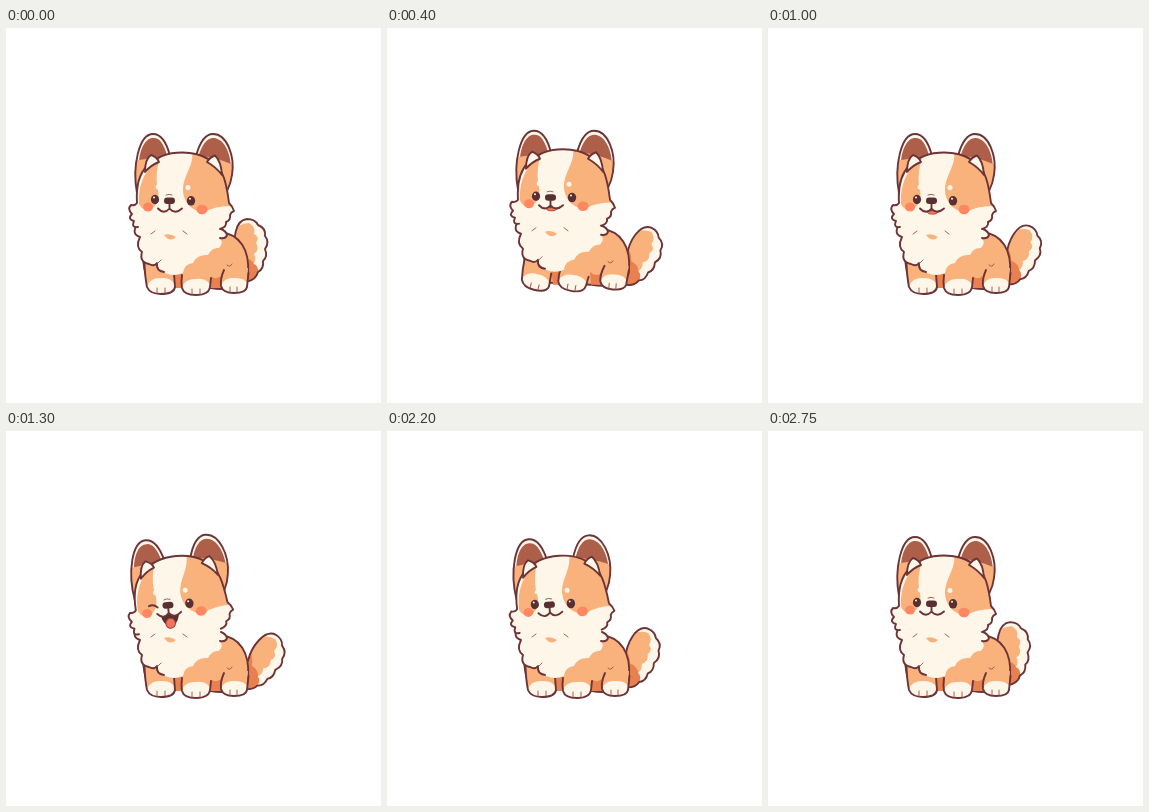
An HTML page that plays this animation: 375x375 px, repeating every 2.8 s.

```html
<!DOCTYPE html>
<html lang="en">
<head>
<meta charset="utf-8">
<title>Puppy</title>
<style>
html, body { margin: 0; width: 100%; height: 100%; overflow: hidden; background: #fff; }
svg { display: block; width: 100vw; height: 100vh; }
.line { stroke: #6c3437; stroke-width: 1.9; stroke-linecap: round; stroke-linejoin: round; }
.thin { stroke: #9a5245; stroke-width: .9; stroke-linecap: round; fill: none; }
.none { fill: none; }
.fur { fill: #f9b27c; }
.shade { fill: #e8804f; }
.cream { fill: #fff6ea; }
.brown { fill: #ae5f4a; }
.dark { fill: #592f32; }
.blush { fill: #ff8862; }
</style>
</head>
<body>
<svg viewBox="0 0 375 375">
  <defs>
    <path id="skull" d="M132 199Q125 200 128 193Q121 191 126 186Q121 181 125 177Q129 178 131 175C130 160 133 146 141 138C151 128 164 124.500 176 124.500C198 124.500 213 135 218 150C221 159 222 167 223 175Q227 179 228 183Q225 184 224 187Q225 192 220 194Q221 199 214 201"/>
    <path id="plume" d="M231 228C226 212 229 192 241 191Q249 191 252 197Q260 200 259 208Q264 214 259 221Q262 229 257 233Q258 241 252 244Q250 252 240 254L230 250Z"/>
    <path id="earL" d="M131 165C126 138 133 106 147 106C156 106 161 116 164 128L148 150Z"/>
    <path id="earR" d="M190 128C193 117 198 106 207 106C221 106 229 128 226 147Q225 155 221 163L206 152Z"/>
    <clipPath id="inSkull"><use href="#skull"/></clipPath>
    <clipPath id="inPlume"><use href="#plume"/></clipPath>
    <clipPath id="inEarL"><use href="#earL"/></clipPath>
    <clipPath id="inEarR"><use href="#earR"/></clipPath>
  </defs>

  <g id="tail">
    <use href="#plume" class="cream"/>
    <g clip-path="url(#inPlume)">
      <path class="fur" d="M226 258V206Q232 195 243 195Q250 199 248 206Q254 209 250 215Q254 222 248 226Q251 233 247 236L242 258Z"/>
      <path class="shade" d="M225 258V218Q233 220 237 230Q245 230 248 236Q253 238 252 246L246 258Z"/>
    </g>
    <use href="#plume" class="line none"/>
  </g>

  <g id="dog">
    <path class="line fur" d="M214 204C234 206 244 222 242 246Q241 258 225 260Q215 262 205 260L143 257Q137 242 137 226"/>
    <path class="shade" d="M164 242H178V260H166ZM203 247Q208 253 215 248V260H204Z"/>
    <path class="thin" d="M221 237q3 3 5 -1"/>

    <g id="legB">
      <path class="fur" d="M216 240Q214 250 215 259Q217 265 228 265Q240 265 241 259L242 240Z"/>
      <path class="cream" d="M215 257Q219 249 228 250Q238 249 242 256Q242 265 228 265Q215 265 215 257Z"/>
      <path class="line none" d="M218 242Q214 251 215 258Q217 265 228 265Q240 265 241 259L242.500 245"/>
      <path class="thin" d="M224 259v5M231 259v5"/>
    </g>
    <g id="legL">
      <path class="fur" d="M139 232Q139 248 141 260Q144 266 155 266Q168 266 169 259L168 232Z"/>
      <path class="cream" d="M141 257Q146 249 155 250Q164 249 169 256Q170 266 155 266Q142 266 141 257Z"/>
      <path class="line none" d="M138.500 236Q139 249 141 259Q144 266 155 266Q168 266 169 259L168 246"/>
      <path class="thin" d="M151 260v5M159 260v5"/>
    </g>
    <g id="legM">
      <path class="fur" d="M177 228Q174 248 176 260Q178 267 190 267Q203 267 204 259L208 228Z"/>
      <path class="cream" d="M176 258Q181 250 190 251Q199 250 204 256Q205 267 190 267Q176 267 176 258Z"/>
      <path class="line none" d="M176 247Q175 254 176 260Q178 267 190 267Q203 267 204 259L205 250"/>
      <path class="thin" d="M186 261v5M194 261v5"/>
    </g>

    <path class="cream" d="M131 196Q125 206 134 209Q129 219 136 224Q133 234 143 236Q148 239 151 236Q150 244 159 245Q168 249 177 245Q178 236 187 235Q191 226 202 227Q206 219 213 220Q218 214 214 211Q222 211 221 207Q219 202 214 198L212 186H140Z"/>
    <path class="line none" d="M131 197Q125 206 134 209Q129 219 136 224Q133 234 143 236Q148 239 151 235Q150 243 158 244M215 201Q220 203 221 207Q220 211 214 210"/>
    <path class="fur" d="M158 207Q164 205 170 209Q164 215 158 207Z"/>
    <path class="thin" d="M145 206l4 -3M177 203l4 3M152 235l3 -3"/>

    <g id="head">
      <use href="#earL" class="cream"/>
      <g clip-path="url(#inEarL)">
        <path class="brown" d="M133 134C134 120 140 109 148 110C156 110 159 121 162 130Z"/>
        <path class="fur" d="M126 133Q145 130 168 128V166H126Z"/>
      </g>
      <use href="#earL" class="line none"/>
      <use href="#earR" class="cream"/>
      <g clip-path="url(#inEarR)">
        <path class="brown" d="M192 130C195 118 201 109 208 110C218 111 224 124 225 138Z"/>
        <path class="fur" d="M186 127Q208 128 230 138V166H190Z"/>
      </g>
      <use href="#earR" class="line none"/>

      <use href="#skull" class="cream"/>
      <g clip-path="url(#inSkull)" class="fur">
        <path d="M156 122C151 138 149 150 152 162C154 173 149 181 141 182Q135 181 133 176C132 162 136 148 146 136Z"/>
        <path d="M186 122C189 138 176 148 177 163C178 176 188 184 198 184Q211 177 228 178V120Z"/>
      </g>
      <use href="#skull" class="line none"/>
      <path class="line cream" d="M139 144Q139 131 145 127Q151 129 153 134Q145 137 139 144ZM201 134Q204 129 209 127.500Q215 133 216 147Q210 139 201 134Z"/>

      <g class="cream"><circle cx="152" cy="159" r="2.400"/><circle cx="182" cy="159.500" r="2.500"/></g>
      <ellipse class="blush" cx="142" cy="179" rx="5" ry="4.500"/>
      <ellipse class="blush" cx="196" cy="181.500" rx="5.500" ry="4.800"/>
      <g id="eye">
        <ellipse class="dark" cx="149" cy="171.500" rx="4.100" ry="4.700"/>
        <circle class="cream" cx="148" cy="169.500" r="1"/>
      </g>
      <path id="wink" class="line none" d="M144.500 172Q149 170 153 174"/>
      <ellipse class="dark" cx="185" cy="172.800" rx="4.200" ry="4.800"/>
      <circle class="cream" cx="184" cy="170.700" r="1"/>
      <path class="thin" d="M160 167q3 -1.500 6 0"/>
      <g id="mouth">
        <path class="dark" d="M155.500 182Q164 178 173.500 182C173 188 170 193 165 194C160 194 156 188 155.500 182Z"/>
        <ellipse cx="164.500" cy="191" rx="4.800" ry="5" fill="#f4745a" stroke="#8c4141"/>
      </g>
      <path class="cream" d="M153 180Q163 174 175 180Q168 186 163.500 181Q158 186 153 180Z"/>
      <path class="line none" d="M152 180.500Q158 187 163.500 180.500Q169 187 176 180.500M163.500 176v4"/>
      <rect class="dark" x="158" y="169.500" width="11" height="6.500" rx="3.200"/>
    </g>
  </g>
</svg>
<script>
const LOOP = 2800;
const part = id => document.getElementById(id);
const set = (id, transform) => part(id).setAttribute('transform', transform);
const ease = (t, from, to) => {
  const u = Math.min(1, Math.max(0, (t - from) / (to - from)));
  return (1 - Math.cos(Math.PI * u)) / 2;
};

// Moments when the tail turns: alternately up and out.
const turns = [0, 280, 560, 860, 1150, 1370, 1590, 1840, 2060, 2340, LOOP];
function wag(t) {
  const i = turns.findIndex(end => t < end) - 1;
  const u = ease(t, turns[i], turns[i + 1]);
  return 41 * (i % 2 ? 1 - u : u);
}

function draw(t) {
  const swing = Math.sin(Math.PI * Math.min(1, Math.max(0, (t - 50) / 450)));
  const tilt = -15 * (ease(t, 1100, 1600) - ease(t, 1900, 2350));
  const open = 0.35 * ease(t, 50, 300) + 0.65 * ease(t, 1000, 1250) - ease(t, 1950, 2150);
  const winking = t >= 1200 && t < 2050;

  set('dog', `translate(0 ${-8 * swing ** 2})`);
  set('tail', `rotate(${wag(t)} 233 248)`);
  set('legL', `rotate(${22 * swing} 155 232)`);
  set('legM', `rotate(${16 * swing} 192 232)`);
  set('legB', `rotate(${7 * swing} 230 236)`);
  set('head', `translate(0 ${-tilt / 15}) rotate(${tilt} 175 190)`);
  set('mouth', `translate(0 181) scale(1 ${open}) translate(0 -181)`);
  part('mouth').style.display = open > 0.01 ? '' : 'none';
  part('eye').style.display = winking ? 'none' : '';
  part('wink').style.display = winking ? '' : 'none';
}

function tick() {
  draw(performance.now() % LOOP);
  requestAnimationFrame(tick);
}
tick();
</script>
</body>
</html>
```
